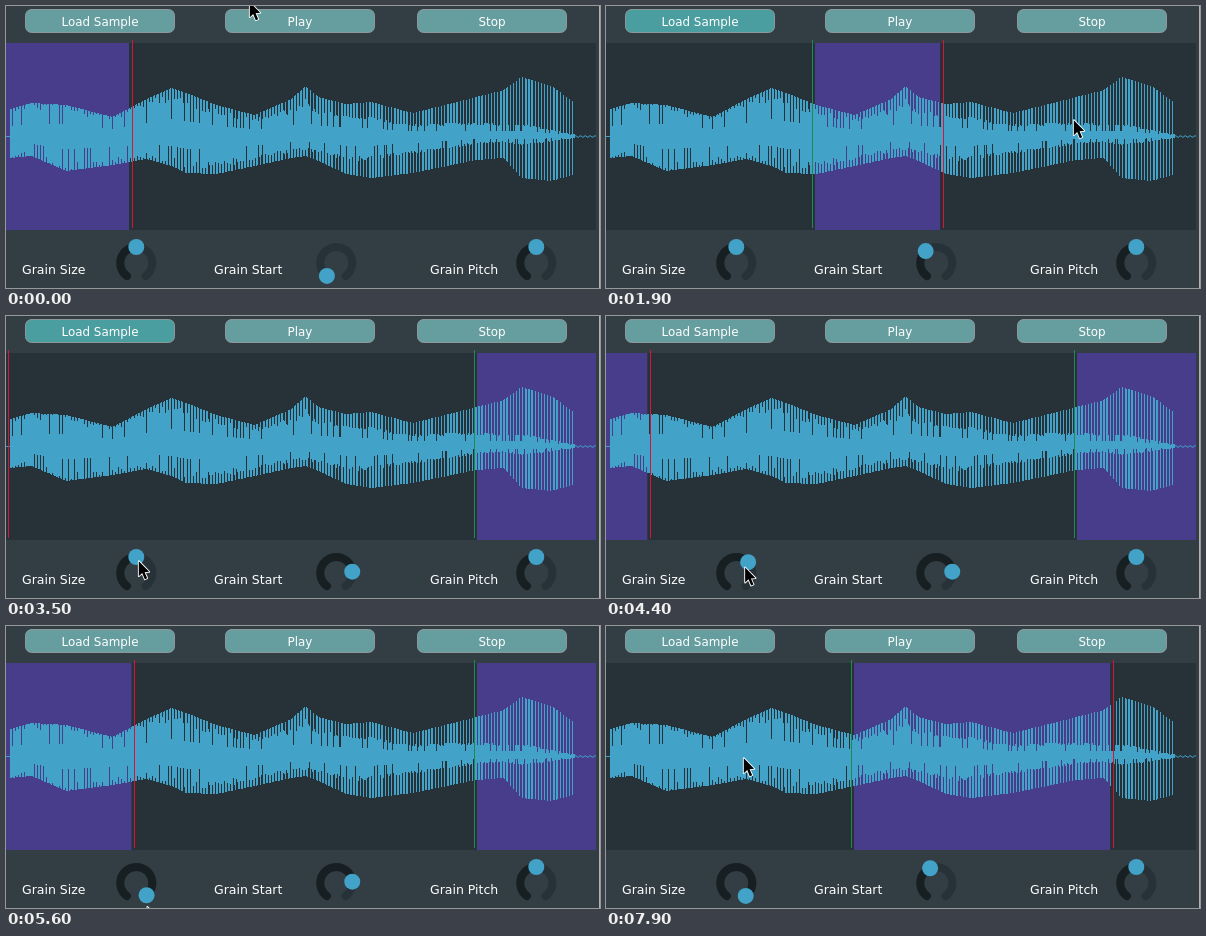
These frames come from a looping animation (594x282 px, 8000 ms). An HTML page with a canvas:

```html
<!DOCTYPE html>
<html lang="en">
<head>
<meta charset="utf-8">
<title>Grain player</title>
<style>
html, body { margin: 0; width: 594px; height: 282px; overflow: hidden; background: #333e44; }
canvas { display: block; }
</style>
</head>
<body>
<canvas id="stage" width="594" height="282"></canvas>
<script>
const g = document.getElementById('stage').getContext('2d');
const LOOP = 8000, TICK = 100;
const BLUE = '#42a2c8', WELL = '#263238', PURPLE = '#483d8b', RED = '#d8143a', GREEN = '#1f8a50';
const FONT = '"DejaVu Sans", Verdana, sans-serif';
const WAVE_W = 590, WAVE_END = 569, WRAP = 598, MID = 130;

// Tracks: [start ms, number of ticks, target values...]
const pointer = [
  [0, 1, 243, -5], [100, 5, 206, 124], [1300, 3, 416, 113], [1800, 2, 467, 113],
  [2500, 2, 196, 224], [2900, 7, 132, 244], [4300, 6, 151, 263], [5300, 5, 138, 284],
  [6400, 1, 240, 246], [6500, 1, 295, 243], [6700, 2, 245, 129], [7800, 2, 137, 131]
];
const grainStart = [[0, 1, -2], [1100, 1, 209], [2200, 1, 471], [7500, 1, 248]];
const grainSize = [[0, 1, 125], [3800, 1, 140], [4300, 6, 225], [4900, 2, 238], [5300, 5, 256]];

function valueAt(track, t) {
  let now = track[0].slice(2);
  for (const [t0, ticks, ...goal] of track) {
    if (t < t0) break;
    const u = Math.min(1, (Math.floor((t - t0) / TICK) + 1) / ticks);
    now = now.map((v, i) => v + (goal[i] - v) * u);
  }
  return now;
}

function noise(n) {
  const v = Math.sin(n * 12.9898 + 4.1) * 43758.5453;
  return v - Math.floor(v);
}

// Outline of the sound: [x, top, bottom]
const outline = [
  [4, 103, 152], [25, 97, 150], [60, 99, 165], [106, 111, 159], [140, 93, 153],
  [165, 82, 160], [180, 87, 167], [210, 99, 168], [248, 109, 160], [285, 93, 152],
  [299, 80, 150], [312, 91, 155], [340, 98, 168], [365, 96, 172], [406, 107, 167],
  [470, 91, 154], [497, 84, 152], [515, 71, 172], [545, 80, 175], [WAVE_END, 97, 168]
];

function extent(x) {
  const i = outline.findIndex(p => p[0] >= x) || 1;
  const [x0, top0, low0] = outline[i - 1], [x1, top1, low1] = outline[i];
  const u = (x - x0) / (x1 - x0);
  return [top0 + (top1 - top0) * u, low0 + (low1 - low0) * u];
}

function makeWave() {
  const c = document.createElement('canvas');
  c.width = WAVE_W;
  c.height = 282;
  const w = c.getContext('2d');
  w.fillStyle = BLUE;
  w.fillRect(0, MID, 4, 1);
  for (let x = 4; x < WAVE_END; x++) {
    // the comb thins out and its solid core shrinks to the right
    const far = x / WAVE_END, core = .95 - .9 * far * far;
    const peak = (x * .32) % 1 < .75 - .38 * far;
    const reach = seed => peak ? 1 : core * (noise(x + seed) < .25 ? .4 : .8 + .25 * noise(x + seed + 300));
    const [top, low] = extent(x);
    const a = MID - (MID - top) * reach(0), b = MID + (low - MID) * reach(1000);
    w.fillRect(x, Math.round(a), 1, Math.round(b) - Math.round(a));
  }
  for (let x = WAVE_END; x < WAVE_W; x++) w.fillRect(x, MID + .7 * Math.sin(x * 1.3), 1, 1);
  return c;
}
const wave = makeWave();

function text(s, x, y, size, align) {
  g.font = size + 'px ' + FONT;
  g.textAlign = align;
  g.fillStyle = '#fff';
  g.fillText(s, x, y);
}

function button(label, x, focused) {
  g.beginPath();
  g.roundRect(x + .5, 3.5, 149, 23, 6);
  g.fillStyle = focused ? '#4b9ea0' : '#669ea0';
  g.fill();
  g.strokeStyle = '#8e989b';
  g.lineWidth = 1;
  g.stroke();
  text(label, x + 75, 20, 11.9, 'center');
}

function knob(label, labelX, cx, value) {
  const cy = 257, r = 16;
  const from = .7 * Math.PI, to = 2.3 * Math.PI, at = from + (to - from) * value;
  const arc = (end, color) => {
    g.beginPath();
    g.arc(cx, cy, r, from, end);
    g.strokeStyle = color;
    g.stroke();
  };
  g.lineWidth = 8;
  g.lineCap = 'round';
  arc(to, WELL);
  if (value > 0) arc(at, '#181f22');
  g.beginPath();
  g.arc(cx + r * Math.cos(at), cy + r * Math.sin(at), 8, 0, 7);
  g.fillStyle = BLUE;
  g.fill();
  text(label, labelX, 268, 12.5, 'left');
}

function band(x0, x1) {
  x0 = Math.max(0, x0);
  x1 = Math.min(WAVE_W, x1);
  g.fillStyle = PURPLE;
  if (x1 > x0) g.fillRect(x0, 37, x1 - x0, 187);
}

function marker(x, color) {
  g.fillStyle = color;
  g.fillRect(Math.round(x), 34, 1, 188);
}

function arrow(x, y) {
  g.save();
  g.translate(x + .8, y + 1.2);
  g.beginPath();
  [[0, 0], [0, 15], [3.4, 11.8], [6, 18], [8.4, 17], [5.8, 11], [10.4, 10.6]]
    .forEach(p => g.lineTo(...p));
  g.closePath();
  g.lineJoin = 'round';
  g.lineWidth = 1.8;
  g.strokeStyle = '#fff';
  g.stroke();
  g.fillStyle = '#000';
  g.fill();
  g.restore();
}

function draw(t) {
  const [start] = valueAt(grainStart, t), [size] = valueAt(grainSize, t);
  const end = start + size, wraps = end > WAVE_W, tail = wraps ? end - WRAP : end;

  g.fillStyle = '#333e44';
  g.fillRect(0, 0, 594, 282);
  g.fillStyle = WELL;
  g.fillRect(0, 37, WAVE_W, 187);
  band(start, end);
  if (wraps) band(0, tail);
  g.drawImage(wave, 0, 0);
  marker(start - 3, GREEN);
  marker(Math.max(2, tail + 3), RED);

  button('Load Sample', 19, t >= 900 && t < 3800);
  button('Play', 219, false);
  button('Stop', 411, false);
  knob('Grain Size', 16, 130.3, .5 + (size - 125) / 262);
  knob('Grain Start', 208, 330.3, (start + 2) / 594);
  knob('Grain Pitch', 424, 530.3, .5);
  g.fillStyle = '#b4b0ae';
  g.fillRect(593, 0, 1, 282);
  arrow(...valueAt(pointer, t));
}

const began = performance.now();
function frame() {
  draw((performance.now() - began) % LOOP);
  requestAnimationFrame(frame);
}
frame();
</script>
</body>
</html>
```
